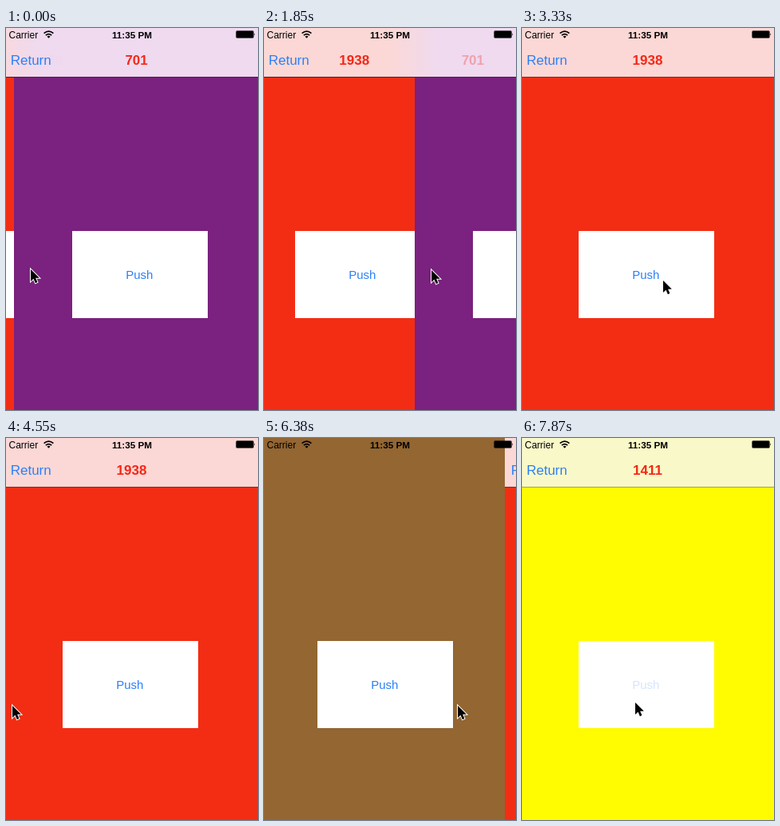
Write an HTML page that moves like this. It is 316 px wide and 478 px high and loops after 8 s.

```html
<!DOCTYPE html>
<html lang="en">
<head>
<meta charset="utf-8">
<title>Swipe back</title>
<style>
  html, body { margin: 0; width: 100%; height: 100%; overflow: hidden; background: #936632; }
  svg { display: block; width: 316px; height: 478px; font-family: "Liberation Sans", Arial, sans-serif; }
  .link { fill: #2b80f7; }
  .push { font-size: 15px; text-anchor: middle; }
  .back { font-size: 17px; }
  .title { font-size: 17px; font-weight: bold; text-anchor: middle; fill: #f52716; }
</style>
</head>
<body>
<svg id="stage" viewBox="0 0 316 478"></svg>
<script>
const LOOP = 8000, STEP = 87.5;
const REST = -2, OFF = 318, PARALLAX = 0.25;

const line = '<rect y="61" width="320" height="1" opacity=".32"/>';
const bar = (fill, title) => `<rect width="320" height="61" fill="${fill}"/>${line}
  <text class="back link" x="7.7" y="46">Return</text>
  <text class="title" x="159.5" y="46">${title}</text>`;
const screen = (id, fill, top = '') => `<g id="${id}">
  <rect width="320" height="478" fill="${fill}"/>
  <rect x="73" y="254" width="170" height="109" fill="#fff"/>
  <text id="${id}Push" class="push link" x="157.3" y="313.6">Push</text>${top}</g>`;

document.getElementById('stage').innerHTML = `
  <defs><linearGradient id="blur" gradientUnits="userSpaceOnUse" x1="0" x2="1" y1="0" y2="0">
    <stop offset="0" stop-color="#fbd8d6"/><stop offset="1" stop-color="#efdaf0"/>
  </linearGradient></defs>
  ${screen('brown', '#936632')}
  ${screen('red', '#f32d14', bar('#fbd8d6', '1938'))}
  ${screen('purple', '#7b217f')}
  ${screen('yellow', '#fffb00', bar('#f9f8c8', '1411'))}
  <g id="shared">
    <rect width="316" height="61" fill="url(#blur)"/>${line}
    <text class="back link" x="5.7" y="46">Return</text>
    <text id="under" class="title" y="46">1938</text>
    <text id="over" class="title" y="46">701</text>
  </g>
  <g id="status">
    <text x="3.5" y="12.8" font-size="12">Carrier</text>
    <text x="158" y="12.5" font-size="11.7" font-weight="bold" text-anchor="middle">11:35 PM</text>
    <g fill="none" stroke="#000" stroke-width="1.7">
      <path d="M47.6 6.7Q53.5 1.6 59.4 6.7"/><path d="M49.8 9.1Q53.5 6 57.2 9.1"/>
    </g>
    <path d="M51.5 10.7Q53.5 9 55.5 10.7L53.5 12.8Z"/>
    <rect x="288.5" y="3.5" width="22" height="9" rx="1.5" fill="none" stroke="#000" opacity=".6"/>
    <rect x="289" y="4" width="21" height="8" rx=".6"/>
    <path d="M311.4 6.5Q313 8 311.4 9.5Z"/>
  </g>
  <path id="cursor" d="M0 0V15L3.5 11.7L5.9 17.2L8.4 16.1L6.1 10.8H10.8Z"
    stroke="#fff" stroke-width="2" paint-order="stroke"/>`;

const el = id => document.getElementById(id);
const set = (id, attrs) => { for (const k in attrs) el(id).setAttribute(k, attrs[k]); };
const move = (id, x, y = 0) => set(id, { transform: `translate(${Math.round(x)} ${Math.round(y)})` });

const clamp = v => Math.min(1, Math.max(0, v));
const mix = (a, b, k) => a + (b - a) * k;
const ramp = (t, from, to) => clamp((t - from) / (to - from));
const glide = (t, from, to) => { const u = ramp(t, from, to); return u * u * (3 - 2 * u); };
const settle = (t, from, to) => 1 - (1 - ramp(t, from, to)) ** 3;
const behind = edge => REST - PARALLAX * (OFF - edge);

// Finger travel while a screen is held
const firstDrag = t => mix(10, 271, glide(t, 155, 2845));
const secondDrag = t => REST + 27 * ramp(t, 4550, 4725)
  + 139 * glide(t, 5000, 5600) + 64 * glide(t, 5500, 6250);

function pointer(t) {
  const back = glide(t, 2850, 3950), aim = glide(t, 6400, 6760);
  const held = mix(firstDrag(t) + 21.3, 2, back)
    + 11 * glide(t, 4462, 4637) + secondDrag(t) - REST;
  const y = mix(302 + 2 * ramp(t, 155, 2500), 335, back);
  return [mix(held, 142, aim), mix(y, 331, aim)];
}

function draw(t) {
  const purple = mix(firstDrag(t), OFF, settle(t, 2800, 3100));
  const red = mix(secondDrag(t), OFF, settle(t, 6240, 6580));
  const yellow = mix(OFF, REST, settle(t, 7040, 7600));
  const swiping = purple < OFF;

  move('purple', purple);
  move('red', swiping ? behind(purple) : red);
  move('brown', behind(Math.min(red, yellow)));
  move('yellow', yellow);

  const done = (purple - REST) / (OFF - REST);
  set('shared', { visibility: swiping ? 'visible' : 'hidden' });
  set('blur', { x1: purple - 32, x2: purple + 32 });
  set('under', { x: 157.5 - 0.342 * (OFF - purple), opacity: clamp(2.2 * done - 0.07) });
  set('over', { x: 157 + 0.55 * (purple - REST), opacity: clamp(1.03 - 1.21 * done) });

  set('brownPush', { opacity: t >= 6990 && t < 7180 ? 0.2 : 1 });
  set('yellowPush', { opacity: t >= 7860 ? 0.2 : 1 });
  move('cursor', ...pointer(t));
}

const start = performance.now();
function tick() {
  const t = (performance.now() - start) % LOOP;
  draw(Math.floor((t + 8) / STEP) * STEP);
  requestAnimationFrame(tick);
}
tick();
</script>
</body>
</html>
```
